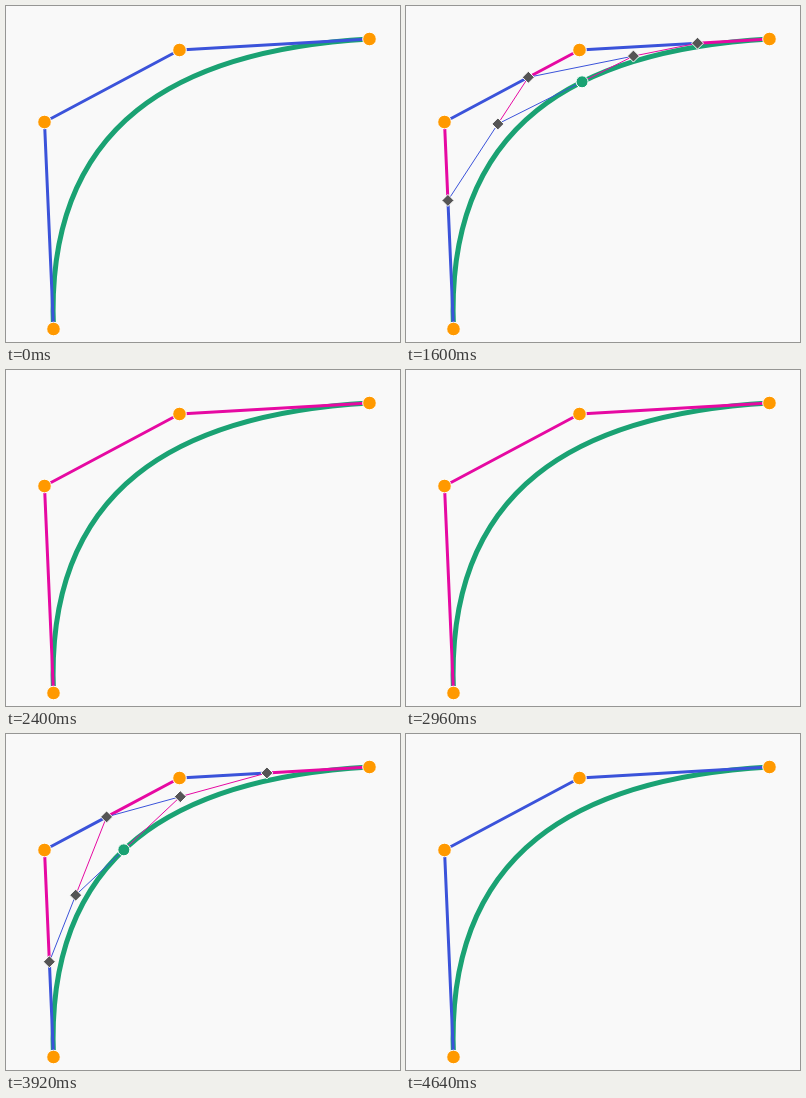
Write an HTML page that moves like this. It is 394 px wide and 336 px high and loops after 4720 ms.

```html
<!DOCTYPE html>
<html lang="en">
<head>
<meta charset="utf-8">
<title>Cubic curve construction</title>
<style>
  html, body { margin: 0; width: 100%; height: 100%; overflow: hidden; background: #f9f9f9; }
  svg { display: block; width: 394px; height: 336px; }
  path { fill: none; }
  .curve { stroke: #1aa273; stroke-width: 5; }
  .near { stroke: #3b53da; }
  .far { stroke: #e609a2; }
  .thick { stroke-width: 3; }
  .thin { stroke-width: 1; }
  .mark { stroke: #fff; stroke-width: 1; }
  .knot { fill: #555; }
  .tip { fill: #1aa273; }
  .anchor { fill: #ff9900; }
</style>
</head>
<body>
<svg viewBox="0 0 394 336">
  <path class="curve" d="M47.5 323C38.5 116 173.5 44 363.5 33"/>
  <path class="near thick" id="nearThick"/>
  <path class="far thick" id="farThick"/>
  <path class="near thin" id="nearThin"/>
  <path class="far thin" id="farThin"/>
  <path class="mark knot" id="knots" style="fill:#555"/>
  <circle class="mark tip" id="tip" r="6"/>
  <g class="mark anchor">
    <circle cx="47.5" cy="323" r="6.8"/>
    <circle cx="38.5" cy="116" r="6.8"/>
    <circle cx="173.5" cy="44" r="6.8"/>
    <circle cx="363.5" cy="33" r="6.8"/>
  </g>
</svg>
<script>
const LOOP = 4720, STEP = 80;
const anchors = [[47.5, 323], [38.5, 116], [173.5, 44], [363.5, 33]];
// [time in ms, curve parameter]
const keys = [
  [0, 1], [1120, 1], [1200, 0.96], [1920, 0.35], [2320, 0.011], [2400, 0],
  [3519, 0], [3520, 0.11], [3680, 0.25], [3920, 0.46], [4560, 1], [LOOP, 1]
];
const $ = id => document.getElementById(id);
const mix = (a, b, t) => a + (b - a) * t;
const between = (p, q, t) => [mix(p[0], q[0], t), mix(p[1], q[1], t)];
const line = (p, q) => `M${p}L${q}`;
const diamond = ([x, y]) => `M${x} ${y - 6}l6 6l-6 6l-6 -6z`;

function paramAt(ms) {
  const i = keys.findIndex(k => k[0] > ms);
  const [t0, v0] = keys[i - 1], [t1, v1] = keys[i];
  return mix(v0, v1, (ms - t0) / (t1 - t0));
}

// Splits each side of a polygon at t into a near and a far part.
function split(points, t) {
  const cuts = points.slice(1).map((q, i) => between(points[i], q, t));
  return {
    cuts,
    near: cuts.map((c, i) => line(points[i], c)).join(''),
    far: cuts.map((c, i) => line(c, points[i + 1])).join('')
  };
}

function draw(t) {
  const a = split(anchors, t), b = split(a.cuts, t), c = split(b.cuts, t);
  $('nearThick').setAttribute('d', a.near);
  $('farThick').setAttribute('d', a.far);
  $('nearThin').setAttribute('d', b.near + c.near);
  $('farThin').setAttribute('d', b.far + c.far);
  $('knots').setAttribute('d', [...a.cuts, ...b.cuts].map(diamond).join(''));
  $('tip').setAttribute('cx', c.cuts[0][0]);
  $('tip').setAttribute('cy', c.cuts[0][1]);
}

const start = performance.now();
function tick() {
  const ms = (performance.now() - start) % LOOP;
  draw(paramAt(Math.floor(ms / STEP) * STEP));
  requestAnimationFrame(tick);
}
tick();
</script>
</body>
</html>
```
